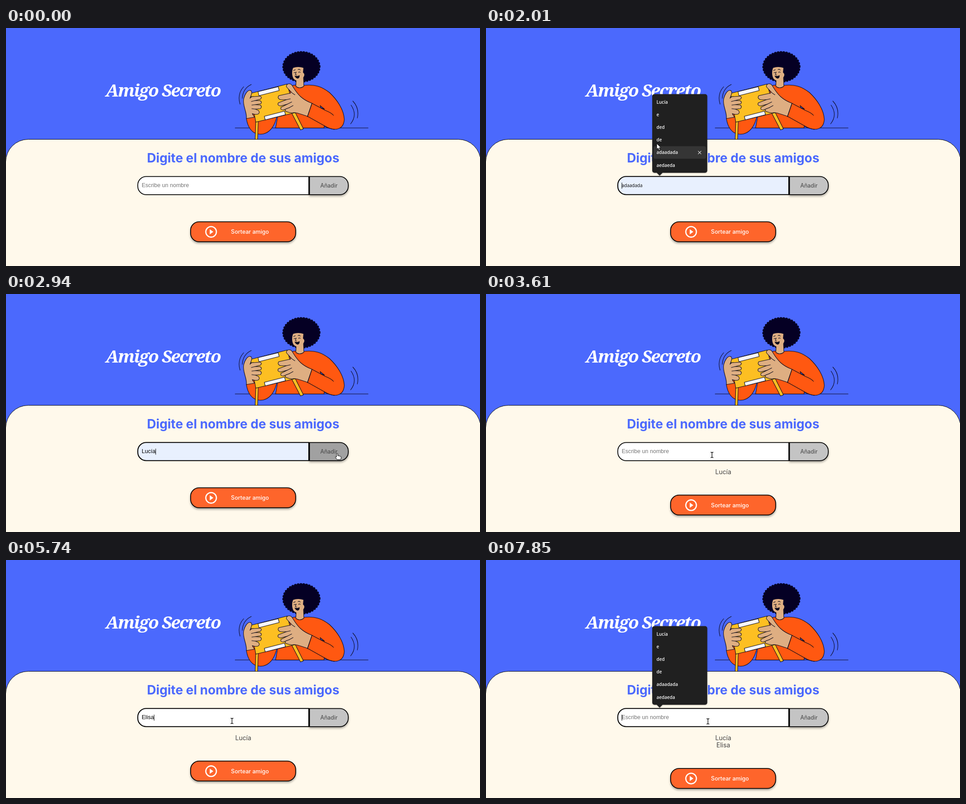
Animation, 1055 px wide and 531 px high, one loop 8 s. Source, as an HTML page:

```html
<!DOCTYPE html>
<html lang="es">
<head>
<meta charset="utf-8">
<title>Amigo Secreto</title>
<style>
  html, body { margin: 0; height: 100%; overflow: hidden; background: #4b69fd; }
  svg { display: block; width: 1055px; height: 531px; }
  text { font: 12.54px Inter, sans-serif; fill: #444; }
  .title { font: italic 900 39px "Noto Serif", serif; letter-spacing: -2.2px; fill: #fff; }
  .heading { font-size: 28.2px; font-weight: 700; fill: #4b69fd; }
  .mid { text-anchor: middle; }
  #names text { font-size: 14.1px; }
  #value { font-family: "Liberation Sans", Arial, sans-serif; }
  #value.preview { font: 10px "Open Sans", sans-serif; }
  .menu text { font: 600 10px "Open Sans", sans-serif; fill: #f4f4f4; }
  .menu { fill: #202020; filter: drop-shadow(0 1px 1px #0004); }
  .box { stroke: #000; stroke-width: 1.8; }
  .shadow { filter: drop-shadow(0 3px 2.2px #0005); }
  .art { stroke: #0c0a1c; stroke-width: 1.1; stroke-linejoin: round; stroke-linecap: round; }
  .skin { fill: #deae82; }
  .shirt { fill: #ff5811; }
  .gift { fill: #fdbf22; }
  .line { fill: none; }
  #cursor path { stroke-linejoin: round; }
</style>
</head>
<body>
<svg viewBox="0 0 1055 531">
  <rect width="1055" height="531" fill="#4b69fd"/>
  <text class="title mid" x="349.5" y="152.5">Amigo Secreto</text>

  <g class="art">
    <path class="line" d="M510 223H806"/>
    <path class="line" d="M546 126Q527 135 526 157M529 131C518 143 517 157 521 170M768 172Q783 194 767 214M772 163Q787 179 782 201"/>
    <path class="shirt" d="M535 202C538 222 548 237 566 237C588 237 599 216 603 196L590 180L552 190Z"/>
    <path class="shirt" d="M600 223L606 190L628 150L634 130Q640 127 646 127Q655 139 663 128C688 125 703 131 720 144C737 160 752 182 753 204C752 219 744 226 731 226C723 226 716 222 708 219L708 223Z"/>
    <path d="M699 173L709 181L701 178Z" fill="#4b69fd"/>
    <path class="line" d="M681 168L711 184Q724 189 729 195M671 197L712 220Q720 225 731 226"/>
    <g fill="#050024" stroke="#050024">
      <ellipse cx="657.5" cy="86.5" rx="39" ry="32"/>
      <ellipse cx="657.5" cy="86.5" rx="39.4" ry="32" fill="none" stroke-width="6.2" stroke-dasharray="0 6.2"/>
    </g>
    <path class="skin" d="M646 114L645 130Q653 137 663 130L662 108Z"/>
    <path class="skin" d="M639 89C636 96 636 106 640 113C646 120 657 119 661 111Q667 104 661 99L662 89Q650 85 639 89Z" stroke="none"/>
    <path class="line" d="M640 95l4 -2M650 93q3 -2 5 1M641 100q2 -2 4 0M651 99q2 -2 4 0M646 98l-2 6l3 1"/>
    <path d="M643 107Q649 109 653 106Q653 113 648 112Q645 111 643 107Z" fill="#0c0a1c"/>

    <path class="gift" d="M556 206H561.5L560 250H554.5Z"/>
    <path class="gift" d="M636 190L643 187L662 225L655.5 227.5Z"/>
    <path class="gift" d="M544 146L626 125L643 189L556 210Z"/>
    <path d="M561 142L606 131L608 139.5L563 151ZM575 197L620 185.5L622 193.5L577 205Z" fill="#f6f6fa"/>

    <path class="skin" d="M535 202C537 188 526 174 529 158C531 149 537 139 543 139Q549 140 546 149L543 157Q546 152 552 153L566 152Q571 155 566 159L554 162L565 162Q571 165 567 169L555 171L566 172Q571 176 566 180L555 181L562 184Q566 189 561 192Q555 194 548 191L553 199Z"/>
    <path class="line" d="M554 162L546 164M555 171L547 172M555 181L547 180"/>
    <path class="skin" d="M624 131C624 123 634 122 638 130C650 150 660 160 681 168L671 197C657 193 646 187 638 189C632 190 628 188 623 186Q619 182 624 180L630 178L617 183Q610 183 612 177L626 170L611 174Q603 173 606 167L624 160L611 160Q603 157 607 151L630 146Q636 146 633 141Z"/>
    <path class="line" d="M624 160L633 158M626 170L636 165M630 178L639 173M633 141Q637 146 643 149"/>
    <path class="line" d="M681 168L671 198"/>
  </g>

  <rect x="-.5" y="248.4" width="1057" height="340" rx="50" fill="#fff9eb" stroke="#000"/>
  <text class="heading mid" x="527.8" y="299.5">Digite el nombre de sus amigos</text>

  <path id="add" class="box shadow" d="M675.5 331.3H743a18.8 18.8 0 0 1 18.8 18.8V353a18.8 18.8 0 0 1 -18.8 18.8H675.5Z"/>
  <text class="mid" x="718.8" y="356">Añadir</text>
  <path id="input" class="box" d="M674 331.3H312.1a18.8 18.8 0 0 0 -18.8 18.8V353a18.8 18.8 0 0 0 18.8 18.8H674Z"/>
  <text id="value" x="302" y="355.3"></text>
  <rect id="caret" y="345" width="1" height="13.5"/>

  <g id="names" class="mid"><text x="528" y="402">Lucía</text><text x="528" y="418.4">Elisa</text></g>

  <g id="draw">
    <rect id="drawBox" class="box shadow" x="410.9" y="432.3" width="233.8" height="44.5" rx="18.8"/>
    <circle cx="456.5" cy="454.8" r="11.8" fill="none" stroke="#fff" stroke-width="2.6"/>
    <path d="M453.5 449V460.5L461.5 454.8Z" fill="#fff"/>
    <text class="mid" x="543" y="459.3" style="fill:#fff;font-weight:500">Sortear amigo</text>
  </g>

  <g id="bigMenu" class="menu">
    <path d="M379 322H394L386.5 329.5Z"/>
    <rect x="370" y="147.5" width="122.5" height="175.5" rx="5"/>
    <g id="active">
      <rect x="373" y="151" width="116.5" height="28" rx="4" fill="#353535"/>
      <path d="M472 161.5l7 7m0 -7l-7 7" stroke="#ddd" stroke-width="1.2"/>
    </g>
    <g id="items"></g>
  </g>
  <g id="smallMenu" class="menu">
    <path d="M379 380.5H394L386.5 373.5Z"/>
    <rect x="370" y="379.5" width="122.5" height="34.5" rx="5"/>
    <text x="379.5" y="401">e</text>
  </g>

  <g id="cursor">
    <path id="arrow" d="M0 0V13L3 10.2L5.3 15L7.5 14L5.3 9.5H9.5Z" fill="#fff" stroke="#000"/>
    <g id="beam" fill="none">
      <path id="bar" d="M-3 -6Q0 -6 0 -4.5Q0 -6 3 -6M0 -5V5M-3 6Q0 6 0 4.5Q0 6 3 6"/>
      <use href="#bar" stroke="#fff" stroke-width="3"/>
      <use href="#bar" stroke="#000" stroke-width="1.3"/>
    </g>
    <path id="hand" d="M-1.3 7V-.5Q0 -2.5 1.5 -.5V4Q3 3 4 4.5Q6 3.5 6.7 5.3Q8.5 4.8 8.8 6.5V9.5L7.5 12.5H0L-4 7.5Q-4 5 -1.3 7Z" fill="#fff" stroke="#000"/>
  </g>
</svg>
<script>
const LOOP = 8000, BLINK = 530, ROW = 28.2;
const el = id => document.getElementById(id);
const show = (id, on) => el(id).style.display = on ? '' : 'none';
const inside = (x, y, l, t, r, b) => x > l && x < r && y > t && y < b;

// time, typed value, friends listed, focus, open menu
const phases = [
  [0, '', 0, 0, ''],
  [1490, '', 0, 1, 'big'],
  [2420, 'Lucía', 0, 1, ''],
  [3200, '', 1, 0, ''],
  [3880, '', 1, 1, 'big'],
  [4730, 'E', 1, 1, 'small'],
  [4930, 'Ei', 1, 1, ''],
  [5330, 'E', 1, 1, 'small'],
  [5400, 'El', 1, 1, ''],
  [5500, 'Eli', 1, 1, ''],
  [5600, 'Elis', 1, 1, ''],
  [5740, 'Elisa', 1, 1, ''],
  [6770, '', 2, 0, ''],
  [7590, '', 2, 1, 'big']
];

// time, x, y, linear approach
const path = [
  [0, 992, 550], [119, 992, 550], [120, 990, 522], [890, 397, 402, 1], [1160, 363, 342],
  [1560, 363, 342], [2010, 380, 258, 1], [2270, 386, 165, 1], [2420, 386, 165],
  [2920, 737, 357], [3200, 737, 357], [3610, 503, 359], [6220, 503, 359],
  [6630, 720, 356], [6800, 720, 356], [7530, 494, 360], [LOOP, 494, 360]
];

const words = ['Lucía', 'e', 'ded', 'de', 'adaadada', 'aedaeda'];
el('items').innerHTML = words.map((w, i) =>
  `<text x="379.5" y="${168.5 + i * ROW}">${w}</text>`).join('');

function pointer(t) {
  const i = path.findIndex(k => k[0] > t);
  const [t0, x0, y0] = path[i - 1], [t1, x1, y1, linear] = path[i];
  const u = (t - t0) / (t1 - t0), e = linear ? u : u * u * (3 - 2 * u);
  return [x0 + (x1 - x0) * e, y0 + (y1 - y0) * e];
}

function render(t) {
  const [start, typed, count, focus, menu] = phases.filter(p => p[0] <= t).pop();
  const [x, y] = pointer(t), shift = count * 16.4;
  const inMenu = menu === 'big' && inside(x, y, 370, 143, 493, 315);
  const row = inMenu ? Math.max(0, Math.floor((y + 8 - 151) / ROW)) : -1;
  const onAdd = inside(x, y, 675, 331, 762, 372);
  const onDraw = inside(x, y, 411, 432 + shift, 645, 477 + shift);
  const onInput = !inMenu && inside(x, y, 293, 331, 675, 372);

  const value = el('value');
  value.textContent = inMenu ? words[row] : typed || 'Escribe un nombre';
  value.setAttribute('class', inMenu ? 'preview' : '');
  value.style.fill = inMenu || typed ? '#000' : '#757575';
  el('caret').setAttribute('x', 302 + (typed ? value.getComputedTextLength() : 0));
  show('caret', focus && Math.floor((t - start) / BLINK) % 2 === 0);

  const input = el('input');
  input.style.fill = inMenu || typed === words[0] ? '#e8f0fe' : '#fff';
  input.style.strokeLinejoin = focus ? 'round' : 'miter';
  input.style.strokeWidth = focus ? 2.1 : 1.8;
  el('add').style.fill = onAdd ? '#a1a1a1' : '#c4c4c4';
  el('drawBox').style.fill = onDraw ? '#e55720' : '#fe652b';
  el('draw').setAttribute('transform', `translate(0 ${shift})`);
  [...el('names').children].forEach((n, i) => n.style.display = i < count ? '' : 'none');

  show('bigMenu', menu === 'big');
  show('smallMenu', menu === 'small');
  show('active', inMenu);
  el('active').setAttribute('transform', `translate(0 ${row * ROW})`);

  el('cursor').setAttribute('transform', `translate(${x} ${y})`);
  show('hand', onAdd || onDraw);
  show('beam', onInput);
  show('arrow', !onAdd && !onDraw && !onInput);
}

function frame(now) {
  render(now % LOOP);
  requestAnimationFrame(frame);
}
render(0);
requestAnimationFrame(frame);
</script>
</body>
</html>
```
